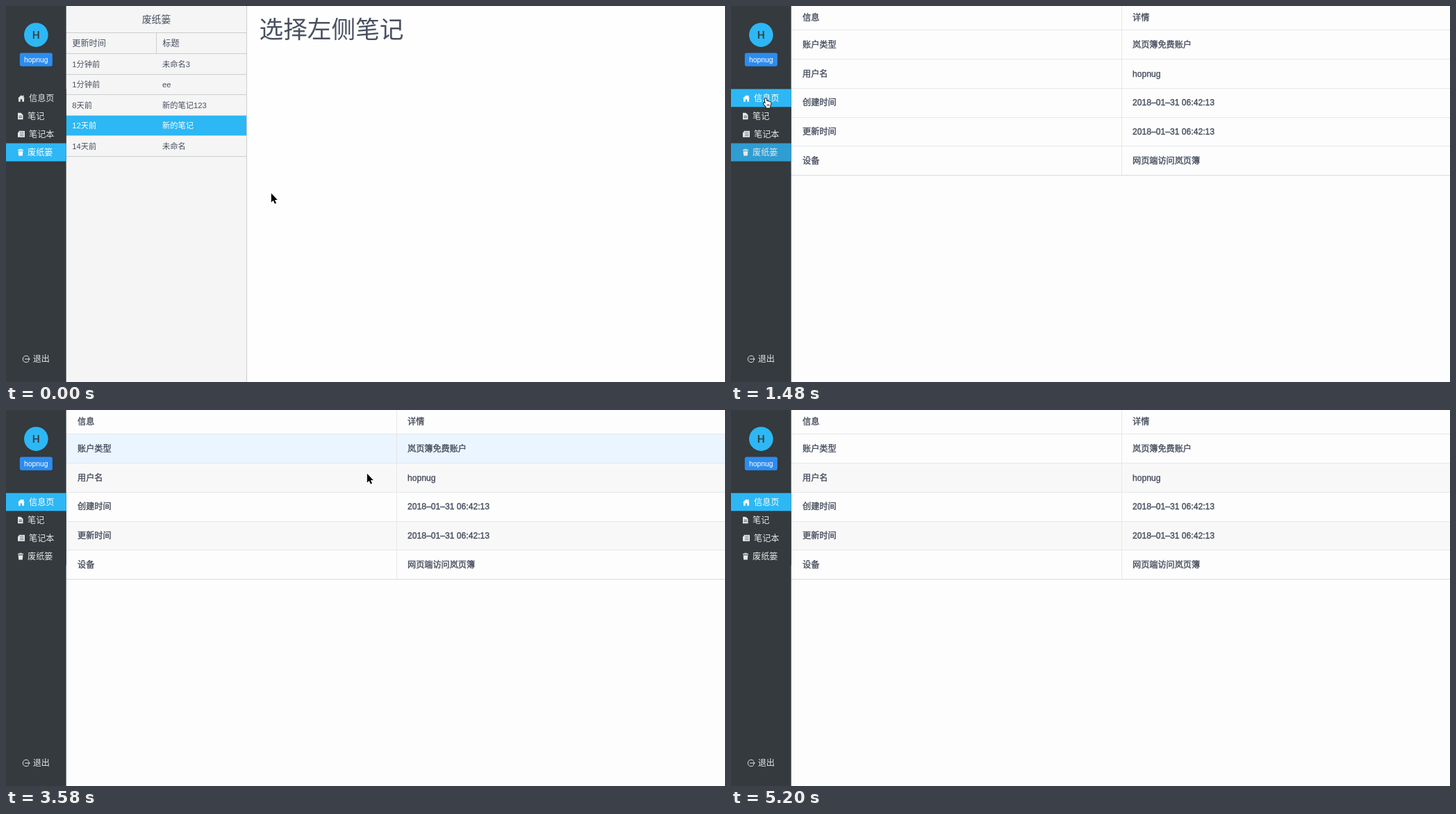
Recreate the animation shown at these times as an HTML page with a canvas. Size 1035x541 px, loop 6030 ms.

```html
<!DOCTYPE html>
<html lang="zh-CN">
<head>
<meta charset="utf-8">
<style>
html, body { margin: 0; width: 100%; height: 100%; overflow: hidden; background: #fefefe; }
canvas { display: block; }
</style>
</head>
<body>
<canvas id="stage" width="1035" height="541"></canvas>
<script>
const ctx = document.getElementById('stage').getContext('2d');
const LOOP = 6030, PAGE_SWITCH = 1480, PAGE_SETTLED = 2710;
const FONT = '"Liberation Sans", "Noto Sans CJK SC", "Noto Sans CJK", sans-serif';
const BLUE = '#2db7f5', DARK = '#343a3d', INK = '#495060', PALE = '#e6e7e7', RULE = '#e6e7e9', GRID = '#cccdce';
const USER = 'hopnug', APP = '岚页簿';

// Layout is a web page shown at this zoom
const ZOOM = 0.8665;
const SIDE = 100 * ZOOM, SMALL = 13 * ZOOM, BODY = 14 * ZOOM;
const MENU_TOP = 119.5, MENU_STEP = 30 * ZOOM;
const LIST_TOP = 68.4, LIST_STEP = 29.5;
const INFO_TOP = 34.4, INFO_STEP = 41.7;

const listRows = [['1分钟前', '未命名3'], ['1分钟前', 'ee'], ['8天前', '新的笔记123'],
  ['12天前', '新的笔记'], ['14天前', '未命名']];
const infoRows = [['账户类型', APP + '免费账户'], ['用户名', USER],
  ['创建时间', '2018–01–31 06:42:13'], ['更新时间', '2018–01–31 06:42:13'],
  ['设备', '网页端访问' + APP]];
const menu = ['信息页', '笔记', '笔记本', '废纸篓'];

// Each pointer stroke is a curve towards `end`, bent by `via`
const strokes = [
  { from: 300, to: 1030, steps: 6, via: [35, 85], end: [46, 132], ease: 0.71 },
  { from: 1630, to: 2400, steps: 6, via: [400, 262], end: [690, 262], ease: 1 },
  { from: 2550, to: 3580, steps: 8, via: [753, -17], end: [519, 91], ease: 1.2 },
  { from: 3730, to: 4750, steps: 8, via: [570, 125], end: [518, 222], ease: 1.2 },
  { from: 4900, to: 5200, steps: 3, via: [550, 400], end: [600, 650], ease: 1 }
];

function buildPoses() {
  let rest = [381, 269];
  const poses = [{ t: 0, at: rest }];
  for (const { from, to, steps, via, end, ease } of strokes) {
    if (from > PAGE_SWITCH && poses.at(-1).t < PAGE_SWITCH) poses.push({ t: PAGE_SWITCH, at: rest });
    for (let k = 0; k < steps; k++) {
      const f = ((k + 1) / steps) ** ease, g = 1 - f;
      poses.push({
        t: Math.floor((from + (to - from) * k / (steps - 1)) / 10) * 10,
        at: rest.map((v, i) => g * g * v + 2 * f * g * via[i] + f * f * end[i])
      });
    }
    rest = end;
  }
  return poses;
}
const poses = buildPoses();

function rect(x, y, w, h, color) {
  ctx.fillStyle = color;
  ctx.fillRect(x, y, w, h);
}

function text(str, x, mid, size, color, { align = 'left', medium = false } = {}) {
  ctx.font = `${size}px ${FONT}`;
  ctx.textAlign = align;
  ctx.fillStyle = ctx.strokeStyle = color;
  ctx.fillText(str, x, mid + size * 0.37);
  if (medium) {
    ctx.lineWidth = 0.4;
    ctx.strokeText(str, x, mid + size * 0.37);
  }
}

function shape(path, color) {
  ctx.fillStyle = color;
  ctx.fill(new Path2D(path));
}

function band(y, top, step, count) {
  const i = Math.floor((y - top) / step);
  return i >= 0 && i < count ? i : -1;
}
const menuAt = ([x, y]) => x < SIDE ? band(y, MENU_TOP, MENU_STEP, 4) : -1;
const listRowAt = ([x, y]) => x > SIDE && x < 346 ? band(y, LIST_TOP, LIST_STEP, 5) : -1;
const infoRowAt = ([x, y]) => x > SIDE ? band(y, INFO_TOP, INFO_STEP, 5) : -1;

// Menu icons, drawn from their top left corner
const icons = [
  fg => {
    shape('M0 5L5 .5L10 5Z', fg);
    rect(7, 1, 1.5, 3, fg);
    rect(1, 5, 2.8, 5, fg);
    rect(6.2, 5, 2.8, 5, fg);
    rect(3, 4.5, 4, 2, fg);
  },
  (fg, bg) => {
    shape('M0 0H4.4L7.5 3V9.5H0Z', fg);
    for (const y of [4.2, 6.5]) rect(1.5, y, 4.5, 0.8, bg);
  },
  (fg, bg) => {
    shape('M1.5 0H10V9H0V2H1.5Z', fg);
    for (const y of [2, 4.2, 6.4]) rect(3, y, 5.5, 0.6, bg);
  },
  fg => {
    rect(0, 1, 8, 1.4, fg);
    rect(2.3, 0, 3.4, 1, fg);
    shape('M.6 3.2H7.4L6.8 9.7H1.2Z', fg);
  }
];

function drawSidebar(t, hover) {
  const mid = SIDE / 2;
  rect(0, 0, SIDE, 541, DARK);
  ctx.beginPath();
  ctx.arc(mid, 41.6, 20 * ZOOM, 0, Math.PI * 2);
  ctx.fillStyle = BLUE;
  ctx.fill();
  ctx.font = '500 15.5px Roboto, sans-serif';
  ctx.textAlign = 'center';
  ctx.fillStyle = DARK;
  ctx.fillText(USER[0].toUpperCase(), mid, 47);

  ctx.beginPath();
  ctx.roundRect(mid - 23.5, 67.6, 47, 22 * ZOOM, 2.6);
  ctx.fillStyle = '#2d8cf0';
  ctx.fill();
  text(USER, mid, 77, 12 * ZOOM, '#fff', { align: 'center' });

  const active = t < PAGE_SWITCH ? 3 : 0;
  menu.forEach((label, i) => {
    const y = MENU_TOP + i * MENU_STEP;
    const lit = i === active || i === hover;
    const fading = i === 3 && t === PAGE_SWITCH;
    const bg = lit ? BLUE : fading ? '#2f9dd1' : DARK;
    const fg = lit ? '#fff' : PALE;
    rect(0, y, SIDE, MENU_STEP, bg);
    ctx.save();
    ctx.translate(17, y + 8.2);
    icons[i](fg, bg);
    ctx.restore();
    text(label, i % 2 ? 31 : 33, y + 13.1, BODY, fg);
  });

  ctx.strokeStyle = PALE;
  ctx.lineWidth = 1;
  ctx.beginPath();
  ctx.arc(29, 508, 4.7, 0.6, Math.PI * 2 - 0.6);
  ctx.stroke();
  ctx.stroke(new Path2D('M27 508H34M32 506L34.2 508L32 510'));
  text('退出', 38.7, 508, BODY, PALE);
}

function drawList(hover) {
  rect(0, 0, 1035, 541, '#fefefe');
  rect(0, 0, 346, 541, '#f5f5f5');
  text('废纸篓', 216.5, 18.5, 16 * ZOOM, INK, { align: 'center' });
  text('更新时间', 95.3, 53.7, BODY, INK);
  text('标题', 225.3, 53.7, BODY, INK);
  rect(0, 38, 346, 1, GRID);
  rect(0, 68, 346, 1, GRID);
  listRows.forEach(([when, title], i) => {
    const top = Math.round(LIST_TOP + i * LIST_STEP);
    const bottom = Math.round(LIST_TOP + (i + 1) * LIST_STEP);
    const mid = LIST_TOP + (i + 0.5) * LIST_STEP + 0.5;
    const selected = i === 3;
    let color = INK;
    if (selected || i === hover) {
      rect(0, top + 1, 346, bottom - top, selected ? BLUE : '#57c4f5');
      color = selected ? '#fff' : '#c3d9e6';
    }
    rect(0, bottom, 346, 1, GRID);
    text(when, 95.3, mid, SMALL, color);
    text(title, 225, mid, SMALL, color);
  });
  rect(216, 38, 1, 31, GRID);
  rect(346, 0, 1, 541, GRID);
  text('选择左侧笔记', 364.5, 33, 40 * ZOOM, INK);
}

function drawInfo(t, hover) {
  const settled = t >= PAGE_SETTLED;
  const pair = (name, value, mid) => {
    text(name, 103, mid, BODY, INK, { medium: true });
    text(value, 578, mid, BODY, INK, { medium: true });
  };
  rect(0, 0, 1035, 541, '#fdfdfd');
  pair('信息', '详情', 16.5);
  rect(0, 34, 1035, 1, RULE);
  infoRows.forEach(([name, value], i) => {
    const top = Math.round(INFO_TOP + i * INFO_STEP) + 1;
    const bottom = Math.round(INFO_TOP + (i + 1) * INFO_STEP);
    if (settled && i === hover) rect(0, top, 1035, bottom - top, '#ebf5ff');
    else if (settled && i % 2) rect(0, top, 1035, bottom - top, '#f8f8f8');
    rect(0, bottom, 1035, 1, i === 4 ? '#dadbde' : RULE);
    pair(name, value, INFO_TOP + (i + 0.5) * INFO_STEP + 0.3);
  });
  rect(562, 0, 1, 243, RULE);
}

const arrow = new Path2D('M.8 .4V13.4L3.7 10.7L5.9 15.6L8 14.7L5.9 9.9H9.8Z');
const hand = new Path2D('M2.6 1.6Q3.7 0 4.8 1.5L5.6 5.2Q7 4 7.6 5.5Q9 4.6 9.5 6Q11 5.4 11.3 7' +
  'V9.5L10.2 12.2V14.5H4.6V12.8L1 9Q.6 7 2.2 7.6L3.6 8.7Z');

function drawPointer(at) {
  ctx.save();
  ctx.translate(...at);
  ctx.lineJoin = 'round';
  const pointing = menuAt(at) >= 0;
  const outline = pointing ? hand : arrow;
  ctx.strokeStyle = pointing ? '#111' : '#fff';
  ctx.fillStyle = pointing ? '#fff' : '#000';
  ctx.lineWidth = 1.8;
  ctx.stroke(outline);
  ctx.fill(outline);
  if (pointing) for (const x of [6, 7.5, 9]) rect(x - 0.3, 9, 0.6, 3, '#111');
  ctx.restore();
}

function draw(now) {
  const i = poses.findLastIndex(p => p.t <= now % LOOP);
  const { t, at } = poses[i];
  // Highlights trail the pointer by one refresh
  const last = poses[Math.max(0, i - 1)].at;
  if (t < PAGE_SWITCH) drawList(listRowAt(last));
  else drawInfo(t, infoRowAt(last));
  drawSidebar(t, menuAt(last));
  drawPointer(at);
}

const start = performance.now();
function loop() {
  draw(performance.now() - start);
  requestAnimationFrame(loop);
}
loop();
</script>
</body>
</html>
```
